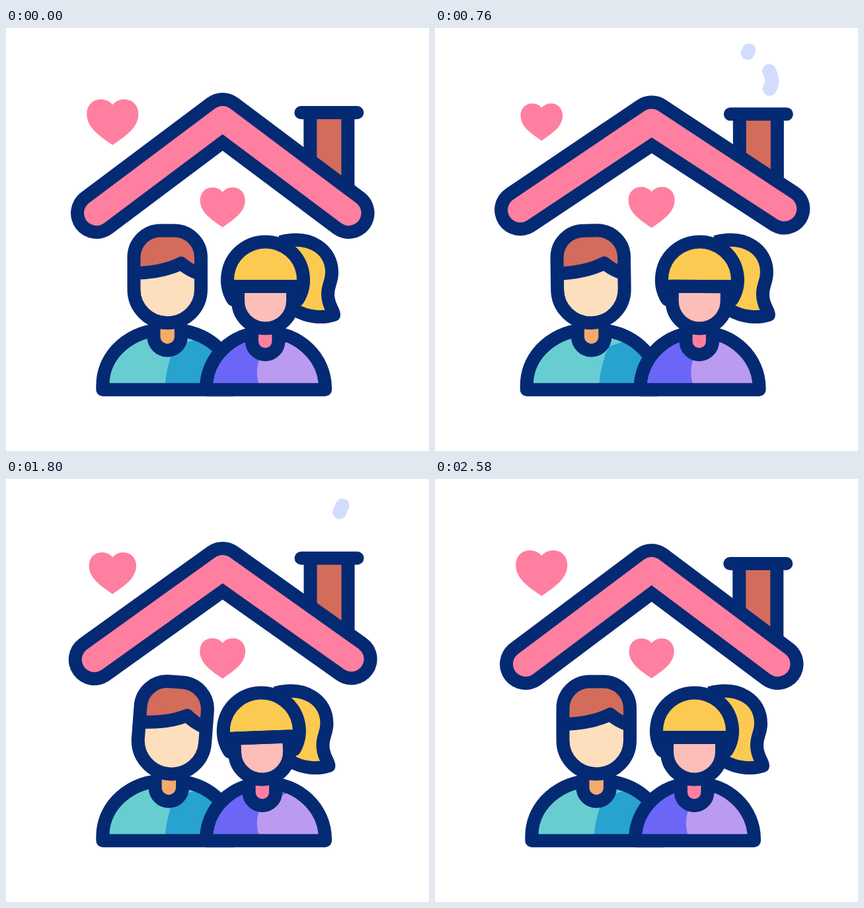
An HTML page that plays this animation: 640x640 px, repeating every 2600 ms.

```html
<!DOCTYPE html>
<html lang="en">
<head>
<meta charset="utf-8">
<title>Couple at home</title>
<style>
  html, body { margin: 0; width: 100%; height: 100%; overflow: hidden; background: #fff; }
  svg { display: block; width: 100%; height: 100%; }
  .line { fill: none; stroke: #042a74; stroke-width: 20; stroke-linejoin: round; }
  .smoke { fill: none; stroke: #d2ddfe; stroke-width: 21; stroke-linecap: round; }
  .round { stroke-linecap: round; }
</style>
</head>
<body>
<svg viewBox="0 0 640 640">
  <defs>
    <path id="heart" fill="#ff7fa0" d="M0-26C-6-33-13-34-18-34C-30-34-39-25-39-12C-39 8-22 20 0 35C22 20 39 8 39-12C39-25 30-34 18-34C13-34 6-33 0-26Z"/>
    <path id="manBody" d="M146.3 547.3V541C146.3 493 188 456 244 456C305 456 345 493 345 541V547.3Z"/>
    <path id="womanBody" d="M303 547.3V545C303 499 342 460 393 460S483 499 483 545V547.3Z"/>
    <path id="manHead" d="M193.5 347a40.5 40.5 0 0 1 40.5-40.5h20.5a40.5 40.5 0 0 1 40.5 40.5v48.5a50.75 50.75 0 0 1-101.5 0z"/>
    <clipPath id="manClip"><use href="#manBody"/></clipPath>
    <clipPath id="womanClip"><use href="#womanBody"/></clipPath>
  </defs>

  <path id="smokeLeft" class="smoke" pathLength="1" d="M472 87C479 72 474 65 471 54C469 46 471 41 475 34"/>
  <path id="smokeRight" class="smoke" pathLength="1" d="M505 94C513 82 510 74 505 64C501 54 506 47 509 40"/>

  <g id="chimney">
    <path fill="#d46c5c" d="M460 0H517V108L460 84Z"/>
    <path class="line" d="M460 0V95M517 0V112"/>
    <path class="line round" d="M446 0H531"/>
  </g>
  <path id="roofEdge" class="line" style="stroke-width:78"/>
  <path id="roof" class="line" style="stroke-width:38;stroke:#ff7fa0"/>

  <use id="heartLeft" href="#heart"/>
  <use id="heartMid" href="#heart"/>

  <g id="man">
    <use href="#manBody" fill="#68cdd0"/>
    <g clip-path="url(#manClip)">
      <path id="shade" fill="#28a2cf" d="M255 482Q242 512 240 547H380V440Z"/>
    </g>
    <use href="#manBody" class="line"/>
  </g>
  <path id="manNeck" class="line" style="fill:#f5ab6c" d="M223.5 450V467a20.7 20.7 0 0 0 41.4 0V450"/>
  <g id="manFace">
    <use href="#manHead" fill="#fddfbe"/>
    <path fill="#d46c5c" d="M193.5 371V347a40.5 40.5 0 0 1 40.5-40.5h20.5a40.5 40.5 0 0 1 40.5 40.5V373L265 356Q237 370 193.5 371Z"/>
    <path class="line" d="M193.5 371Q237 370 265 356Q276 366 293 372"/>
    <use href="#manHead" class="line"/>
  </g>

  <path id="tail" class="line" style="fill:#fdca51" d="M415 324C460 312 493 335 493 370C493 385 487 388 487 403C487 420 496 427 496 434C478 440 455 437 438 427"/>
  <g id="woman">
    <use href="#womanBody" fill="#6b66f6"/>
    <path clip-path="url(#womanClip)" fill="#bb9af1" d="M386 496Q374 517 385 547H490V440Z"/>
    <use href="#womanBody" class="line"/>
  </g>
  <path id="womanNeck" class="line" style="fill:#ff7fa0" d="M372 460V474a20.2 20.2 0 0 0 40.4 0V460"/>
  <g id="womanFace">
    <path fill="#fdca51" d="M335 391V381a57.5 57.5 0 0 1 115 0V391Z"/>
    <path class="line" style="fill:#fdbdb8" d="M351 391V413a41.5 41.5 0 0 0 83 0V391Z"/>
    <path class="line round" d="M343.5 411A57.5 57.5 0 1 1 441.5 411"/>
    <path class="line" d="M340 391H445"/>
  </g>
</svg>
<script>
const LOOP = 2600, RELEASE = 1680, REST = 2580;
const $ = id => document.getElementById(id);
const place = (id, value) => $(id).setAttribute("transform", value);

// Progress from 0 to 1 between two times
const ramp = (t, from, to) => Math.min(1, Math.max(0, (t - from) / (to - from)));
const ease = (t, from, to) => {
  const u = ramp(t, from, to);
  return u * u * (3 - 2 * u);
};

// Each puff runs up its path twice
function drawPuff(id, t, start) {
  const local = t < start + 740 ? t - start : t - start - 740;
  const head = ease(local, 0, 500), end = ease(local, 205, 705);
  const { style } = $(id);
  style.display = head - end > 0.002 ? "" : "none";
  style.strokeDasharray = `${head - end} 3`;
  style.strokeDashoffset = -end;
}

// The roof sags slowly, then springs up and settles
function drawRoof(t) {
  let sag = 1 - (1 - ramp(t, 60, RELEASE)) ** 2, hop = 0;
  if (t > RELEASE) {
    const fade = (1 - ramp(t, RELEASE, REST)) ** 2;
    const angle = (t - RELEASE) / 640 * 2 * Math.PI;
    sag = fade * Math.cos(angle);
    hop = 7 * fade * Math.abs(Math.sin(angle));
  }
  const apex = 137 + 6.3 * sag - hop;
  const left = `${137 - 11.7 * sag} ${280 - 7 * sag - hop}`;
  const right = `${518.5 + 14.5 * sag} ${280 - 9.5 * sag - hop}`;
  const inner = apex + 2.4 * Math.max(0, sag);
  for (const id of ["roofEdge", "roof"])
    $(id).setAttribute("d", `M${left}L327.7 ${apex}L${right}L327.7 ${inner}Z`);
  place("chimney", `translate(${0.3 + 0.8 * sag} ${128 + 3.4 * sag - 1.9 * hop})`);
}

function drawHearts(t) {
  const shrink = ease(t, 60, 480) - 0.5 * ease(t, 480, 1060)
    - 0.15 * ease(t, 1060, 1800) - 0.35 * ease(t, 2240, REST);
  const beat = Math.sin(3 * Math.PI * ramp(t, 0, LOOP)) ** 2;
  place("heartLeft", `translate(161.3 142) scale(${1 - 0.243 * shrink})`);
  place("heartMid", `translate(327.7 271) scale(${0.872 + 0.173 * beat})`);
}

// The pair lean apart, together, apart again and back upright
function drawCouple(t) {
  const lean = -5 * ease(t, 60, 360) + 12 * ease(t, 400, 1300)
    - 12 * ease(t, 1600, 2260) + 5 * ease(t, 2260, REST);
  const gap = 10 * (ease(t, 60, 460) - ease(t, 460, 1400))
    + 3 * (ease(t, 1800, 2240) - ease(t, 2240, REST));
  const toward = Math.max(0, lean);
  const manX = toward / 2 - gap, womanX = gap - toward;

  place("man", `translate(${-gap})`);
  place("shade", `translate(${2 * gap})`);
  place("manNeck", `translate(${manX})`);
  place("manFace", `translate(${manX}) rotate(${lean} 244 450)`);
  place("woman", `translate(${gap})`);
  place("womanNeck", `translate(${womanX})`);
  place("womanFace", `translate(${womanX}) rotate(${-lean / 2} 392 430)`);
  place("tail", `translate(${gap - 1.75 * lean})`);
}

function tick() {
  const t = performance.now() % LOOP;
  drawPuff("smokeLeft", t, 140);
  drawPuff("smokeRight", t, 498);
  drawRoof(t);
  drawHearts(t);
  drawCouple(t);
  requestAnimationFrame(tick);
}
tick();
</script>
</body>
</html>
```
